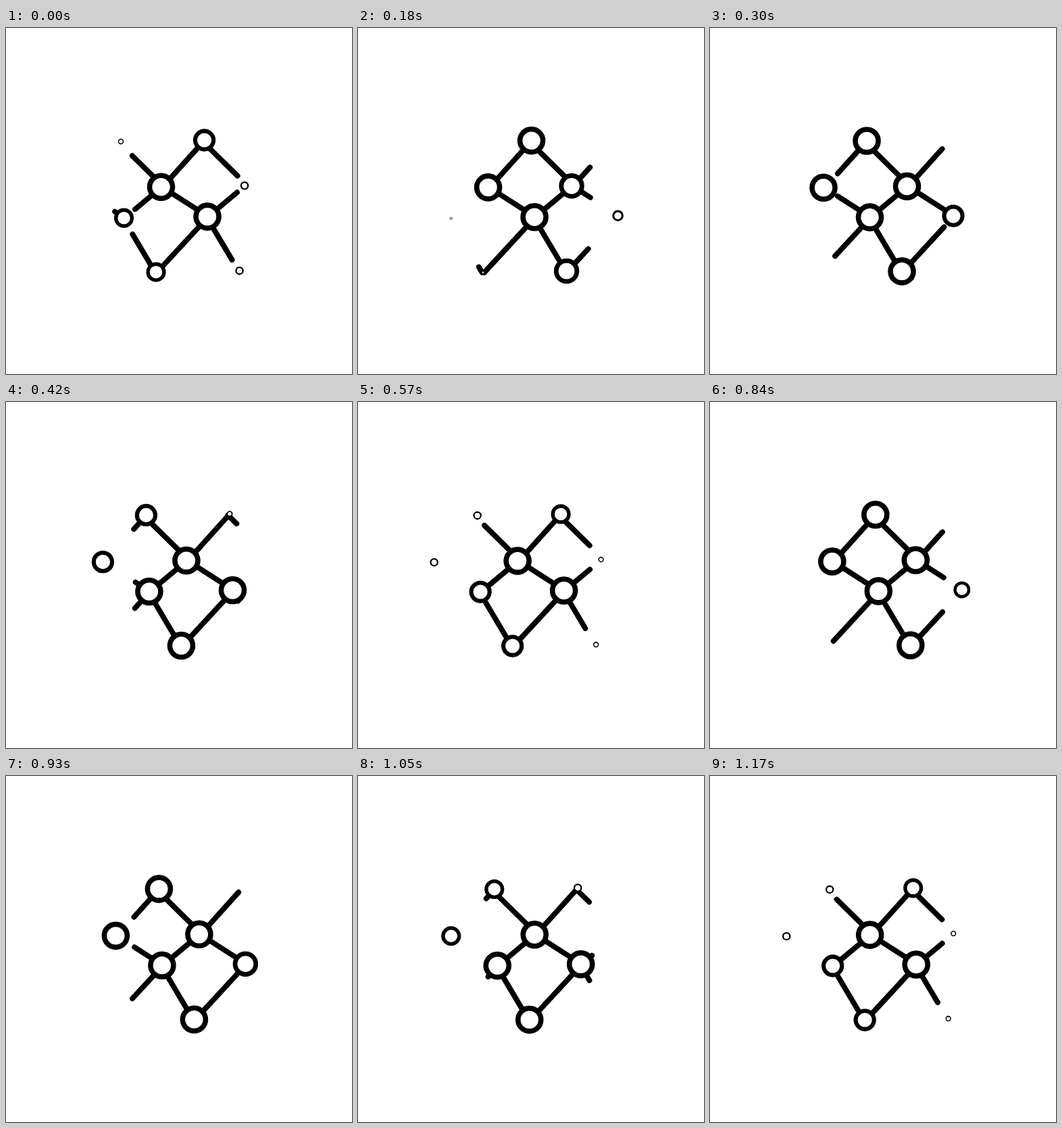
An HTML page with a canvas that plays this animation: 512 px wide and 512 px high, repeating every 1.2 s.

```html
<!DOCTYPE html>
<html lang="en">
<head>
<meta charset="utf-8">
<title>Network loop</title>
<style>
  html, body { margin: 0; width: 100%; height: 100%; overflow: hidden; background: #fff; }
  canvas { display: block; width: 100vw; height: 100vh; }
</style>
</head>
<body>
<canvas id="stage" width="512" height="512"></canvas>
<script>
const ctx = document.getElementById('stage').getContext('2d');

const STEP = 30;      // ms per step
const STEPS = 40;     // steps per loop
const CYCLE = 20;     // steps between two copies of the pattern
const RAMP = 10;      // steps to grow or shrink
const PERIOD = 123.5; // px between two copies
const SPEED = 6.15;   // px per step, leftwards
const TILT = -0.0163;
const RADIUS = 17;
const RING = 7.6;
const LINE = 7.9;

// x at step 0, y at mid stage, first step of growing and of shrinking
const nodes = [
  { x: 293.5, y: 166.6, grow: -8,  shrink: 12 },
  { x: 353,   y: 234.8, grow: -3,  shrink: 32 },
  { x: 298,   y: 279.8, grow: -18, shrink: 17 },
  { x: 345.5, y: 360.6, grow: -3,  shrink: 17 }
];

// left and right node, copies ahead of the right node, first step of drawing and of erasing,
// and how far each end sits off its node's centre
const edges = [
  { a: 0, b: 1, ahead: 0, draw: -8, erase: 17, offA: [-2.5, 2],  offB: [2.5, -1.7] },
  { a: 1, b: 0, ahead: 1, draw: 2,  erase: 27, offA: [2.2, 0],   offB: [0.5, 0] },
  { a: 1, b: 2, ahead: 1, draw: 2,  erase: 27, offA: [0.3, -0.6], offB: [0.3, -0.6] },
  { a: 2, b: 1, ahead: 0, draw: -8, erase: 17, offA: [0, 0.8],   offB: [0, 0.8] },
  { a: 2, b: 3, ahead: 0, draw: -8, erase: 17, offA: [-1.5, 0],  offB: [-1.5, 0] },
  { a: 3, b: 2, ahead: 1, draw: 2,  erase: 27, offA: [1.8, 0],   offB: [1.5, 0] }
];
// one edge left over at the start of the loop
const leftover = { ...edges[2], erase: 32 };

const ramp = (step, start) => Math.min(1, Math.max(0, (step - start) / RAMP));

function place(node, copy, step, [dx, dy] = [0, 0]) {
  const x = node.x + copy * PERIOD - step * SPEED;
  return { x: x + dx, y: node.y + TILT * (x - 256) + dy };
}

function drawEdge(edge, copy, step) {
  const local = step - copy * CYCLE;
  const from = ramp(local, edge.erase);
  const to = ramp(local, edge.draw);
  if (to <= from) return;
  const a = place(nodes[edge.a], copy, step, edge.offA);
  const b = place(nodes[edge.b], copy + edge.ahead, step, edge.offB);
  const dx = b.x - a.x, dy = b.y - a.y;
  ctx.lineWidth = LINE;
  ctx.beginPath();
  ctx.moveTo(a.x + dx * from, a.y + dy * from);
  ctx.lineTo(a.x + dx * to, a.y + dy * to);
  ctx.stroke();
}

function drawNode(node, copy, step) {
  const local = step - copy * CYCLE;
  const size = ramp(local, node.grow) - ramp(local, node.shrink);
  if (size <= 0) return;
  const p = place(node, copy, step);
  ctx.lineWidth = RING * size;
  ctx.beginPath();
  ctx.arc(p.x, p.y, RADIUS * size, 0, Math.PI * 2);
  ctx.fill();
  ctx.stroke();
}

function draw(step) {
  ctx.fillStyle = '#fff';
  ctx.strokeStyle = '#000';
  ctx.lineCap = 'round';
  ctx.fillRect(0, 0, 512, 512);
  drawEdge(leftover, -2, step);
  for (let copy = -1; copy <= 2; copy++) {
    for (const edge of edges) drawEdge(edge, copy, step);
  }
  for (let copy = -1; copy <= 2; copy++) {
    for (const node of nodes) drawNode(node, copy, step);
  }
}

const began = performance.now();
function tick() {
  const time = Math.max(0, performance.now() - began);
  draw(Math.floor(time / STEP) % STEPS);
  requestAnimationFrame(tick);
}
tick();
</script>
</body>
</html>
```
